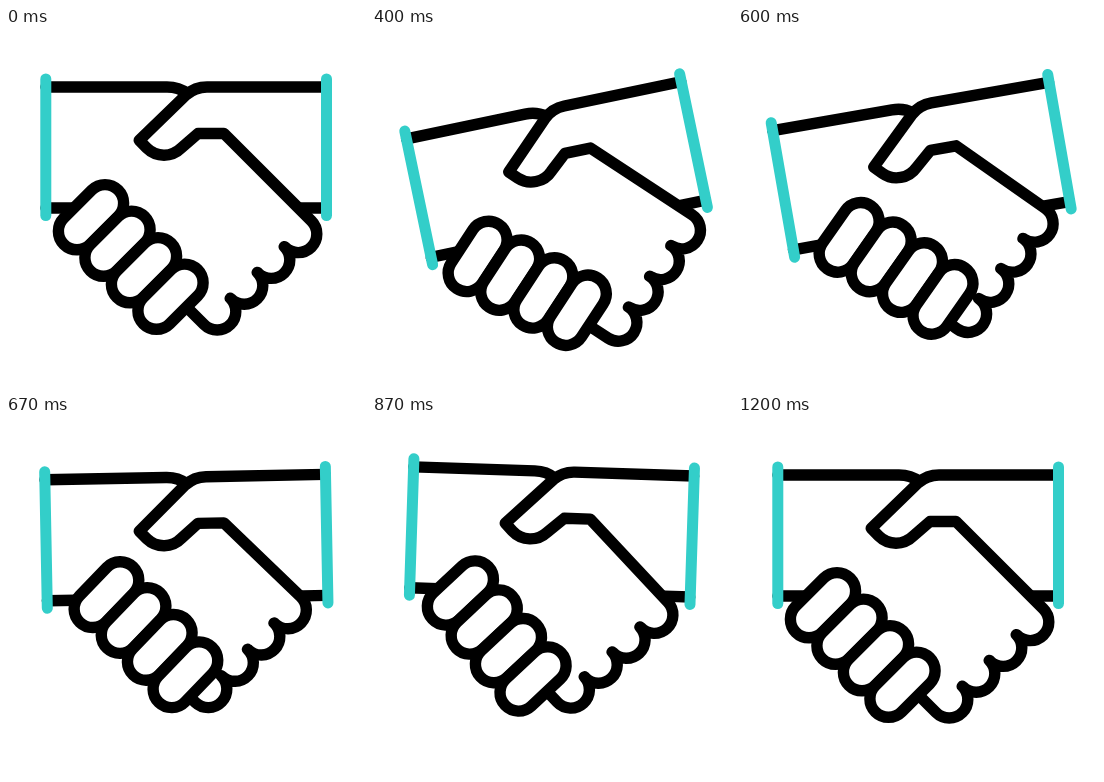
An HTML page with a canvas for the animation above (1670 ms loop, 360 by 360 pixels).

```html
<!DOCTYPE html>
<html lang="en">
<head>
<meta charset="utf-8">
<title>Handshake</title>
<style>
  html, body { margin: 0; width: 100%; height: 100%; overflow: hidden; background: #fff; }
  canvas { display: block; width: 360px; height: 360px; }
</style>
</head>
<body>
<canvas id="stage" width="360" height="360"></canvas>
<script>
const ctx = document.getElementById('stage').getContext('2d');
const LOOP = 1670;
const PIVOT = [289, 111];
const INK = '#000', CUFF = '#33cec9';
const RADIUS = 18.6;

// Keys are [tick, value], with 30 ticks per second.
const SWING = [[7, 0], [15, -17], [23, 6], [30, -4.6], [36, 0]];
const SLIDE_RIGHT = [[9.5, 0], [21, 12.3], [32, 0]];

// The lowest finger leads, the others follow.
const SLIDES_LEFT = [0, 1, 2, 3].map(i => {
  const delay = (3 - i) * 1.25;
  return [[7 + delay, 0], [17 + delay, 14.4], [28.5 + delay * 0.4, 0]];
});

function tween(keys, n) {
  if (n <= keys[0][0]) return keys[0][1];
  for (let i = 1; i < keys.length; i++) {
    const [n0, v0] = keys[i - 1], [n1, v1] = keys[i];
    if (n < n1) {
      const u = (n - n0) / (n1 - n0);
      return v0 + (v1 - v0) * (1 - Math.cos(Math.PI * u)) / 2;
    }
  }
  return keys[keys.length - 1][1];
}

function line(x0, y0, x1, y1, color, width) {
  ctx.strokeStyle = color;
  ctx.lineWidth = width;
  ctx.beginPath();
  ctx.moveTo(x0, y0);
  ctx.lineTo(x1, y1);
  ctx.stroke();
}

function drawSleeves() {
  line(40, 180, 68, 180, INK, 11.4);
  line(295, 180, 320, 180, INK, 11.4);
  ctx.beginPath();
  ctx.moveTo(40, 59);
  ctx.lineTo(161, 59);
  ctx.quadraticCurveTo(173, 59, 181, 65.5);
  ctx.stroke();
}

// Thumb, back of the hand and the row of fingertips in one stroke.
function drawRightHand(slide) {
  ctx.beginPath();
  ctx.moveTo(320, 59);
  ctx.lineTo(201, 59);
  ctx.quadraticCurveTo(189, 59, 180, 67);
  ctx.lineTo(133.2, 112.3);
  ctx.arc(158, 102.8, 24.4, Math.PI * 0.75, Math.PI * 0.25, true);
  ctx.lineTo(192, 105.5);
  ctx.lineTo(218, 105.5);
  for (let i = 0; i < 4; i++) {
    const x = 292.2 - 27 * i - slide, y = 206 + 25.8 * i - slide;
    ctx.arc(x, y, RADIUS, -Math.PI / 4, Math.PI * 0.75);
  }
  ctx.lineTo(182 - slide, 280.5 - slide);
  ctx.stroke();
}

function drawLeftFinger(i, slide) {
  const x = 71 + 26.5 * i + slide, y = 203.2 + 26.5 * i - slide, len = 28;
  ctx.beginPath();
  ctx.arc(x, y, RADIUS, Math.PI / 4, Math.PI * 1.25);
  ctx.arc(x + len, y - len, RADIUS, Math.PI * 1.25, Math.PI / 4);
  ctx.closePath();
  ctx.fill();
  ctx.stroke();
}

function draw(now) {
  const n = Math.floor((now % LOOP) * 0.03 + 0.15);
  ctx.setTransform(1, 0, 0, 1, 0, 0);
  ctx.fillStyle = '#fff';
  ctx.fillRect(0, 0, 360, 360);
  ctx.translate(...PIVOT);
  ctx.rotate(tween(SWING, n) * Math.PI / 180);
  ctx.translate(-PIVOT[0], -PIVOT[1]);
  ctx.lineCap = ctx.lineJoin = 'round';

  drawSleeves();
  drawRightHand(tween(SLIDE_RIGHT, n));
  SLIDES_LEFT.forEach((keys, i) => drawLeftFinger(i, tween(keys, n)));
  line(39.8, 51, 39.8, 187.5, CUFF, 11);
  line(320.5, 51, 320.5, 187.5, CUFF, 11);
}

function tick() {
  draw(performance.now());
  requestAnimationFrame(tick);
}
tick();
</script>
</body>
</html>
```
